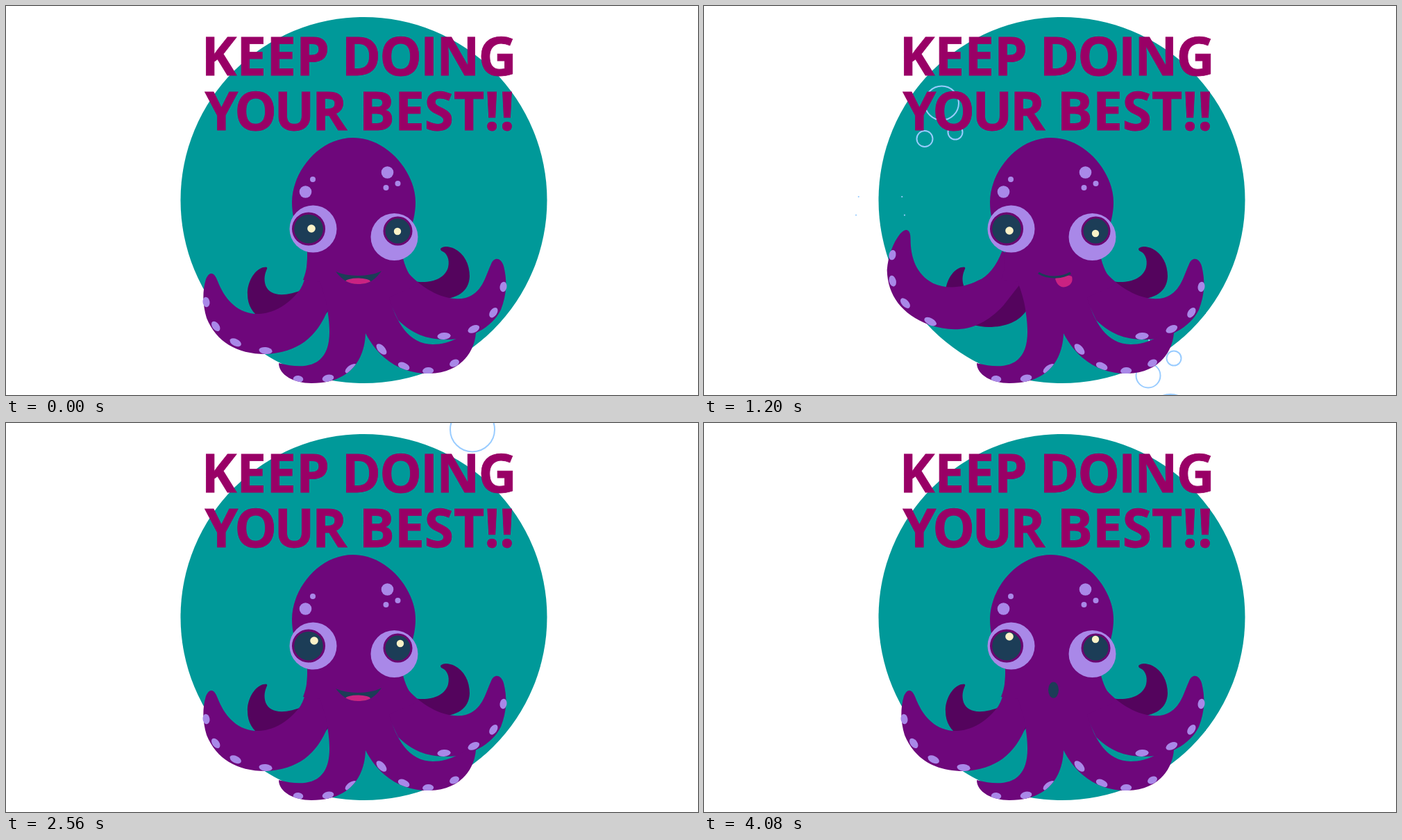
An HTML page that plays this animation: 997 by 561 pixels, repeating every 4.4 s.

```html
<!DOCTYPE html>
<html lang="en">
<head>
<meta charset="utf-8">
<title>Keep doing your best</title>
<style>
  html, body { margin: 0; width: 100%; height: 100%; overflow: hidden; background: #fff; }
  svg { display: block; width: 100%; height: 100%; }
  text { font: 700 76.5px "Open Sans", "Noto Sans", sans-serif; fill: #906; stroke: #906; stroke-width: .8; }
  .skin { fill: #6e077b; }
  .rim { fill: #6a0470; }
  .shade { fill: #54045d; }
  .lilac { fill: #a988e8; }
  .ink { fill: #1c3d57; }
  .glint { fill: #fbf2c8; }
  .pink { fill: #ca2282; }
  .ring { fill: none; stroke: #9cf; stroke-width: 2; }
  .air { fill: #9cf; }
  .shine { fill: #fff; }
</style>
</head>
<body>
<svg viewBox="0 0 997 561">
  <defs>
    <path id="body" d="M500 190C550 190 590 240 590 283C590 318 572 340 572 364C577 383 583 392 595 402
      L552 420C562 455 580 488 615 488C640 488 662 475 677 459C680 492 660 529 610 530C570 531 537 509 518 472
      C517 505 500 544 440 544C415 544 393 532 393 515C435 526 466 518 466 470C466 455 464 445 463 437
      C461 424 457 411 452 398L428 395C434 380 434 370 434 355C430 335 412 320 412 283C412 240 450 190 500 190Z"/>
    <path id="grin" d="M475 383C492 391 525 391 541 382C530 398 520 401 507 401C492 401 484 394 475 383Z"/>
    <clipPath id="inBody"><use href="#body"/></clipPath>
    <clipPath id="inGrin"><use href="#grin"/></clipPath>
    <g id="bigBubble">
      <circle class="air" r="48"/>
      <path class="shine" d="M-15 -38L-5 -41L-8 -34L-17 -32ZM-3 -41C15 -42 32 -33 38 -17C28 -30 14 -36 -5 -35Z"/>
    </g>
  </defs>

  <circle cx="515.5" cy="280" r="264" fill="#099"/>

  <g id="leftRings">
    <circle class="ring" cx="342.5" r="24.5"/>
    <circle class="ring" cx="318" cy="51.5" r="11.5"/>
    <circle class="ring" cx="362" cy="42" r="10.5"/>
  </g>
  <g id="rightRings">
    <circle class="ring" cx="640" r="17.5"/>
    <circle class="ring" cx="677" cy="-25" r="10.5"/>
    <circle class="ring" cx="650" cy="-52.5" r="9"/>
    <circle class="ring" cx="672" cy="59" r="32"/>
  </g>

  <text x="281.5" y="100">KEEP</text>
  <text x="483.5" y="100" letter-spacing="-2">DOING</text>
  <text x="286.5" y="179" letter-spacing="-3.5">YOUR</text>
  <text x="508.5" y="179">BEST!!</text>

  <path class="shade" d="M376 379C373 386 371 393 374 403C380 418 400 421 430 408L455 398L466 437
    C455 455 435 463 410 463C380 462 348 448 348 416C347 400 357 381 370 377C375 376 377 376 376 379Z"/>
  <path class="shade" d="M626 350C630 345 640 347 646 350C660 357 668 372 668 390C667 412 650 423 622 423
    L580 405L583 396C608 402 632 395 637 377C640 364 634 356 629 354C627 353 626 352 626 350Z"/>

  <g id="leftArm">
    <path class="skin" d="M434 365C434 388 428 407 417 417C398 438 376 445 358 444C330 441 314 420 305 397
      C300 383 293 382 288 394C283 410 283 430 289 450C303 484 332 502 374 502C420 500 448 478 464 437L476 398L470 368Z"/>
  </g>
  <path id="rightArm" class="skin" d="M575 380C600 410 635 427 662 421C686 414 690 392 699 372C703 362 713 362 717 375
    C722 395 722 415 713 438C700 465 665 482 634 481C605 481 585 472 565 453L540 400Z"/>
  <use href="#body" class="skin"/>
  <g id="legs" clip-path="url(#inBody)"></g>
  <g id="rightDots"></g>

  <g class="lilac">
    <circle cx="549.5" cy="240" r="8.8"/>
    <circle cx="564.5" cy="256" r="4"/>
    <circle cx="547.5" cy="262" r="4"/>
    <circle cx="431.5" cy="268" r="8.8"/>
    <circle cx="442" cy="250" r="4"/>
    <circle cx="442.5" cy="321.5" r="34"/>
    <circle cx="559.5" cy="333" r="34"/>
  </g>
  <circle class="rim" cx="436" cy="321.5" r="24"/>
  <circle class="ink" cx="436" cy="321.5" r="20.8"/>
  <circle class="rim" cx="564.5" cy="324.5" r="21"/>
  <circle class="ink" cx="564.5" cy="324.5" r="18"/>
  <g id="gaze" class="glint">
    <circle cx="440" cy="321" r="5.8"/>
    <circle cx="564" cy="325" r="5.2"/>
  </g>

  <g id="smile">
    <use href="#grin" class="ink"/>
    <ellipse class="pink" cx="507" cy="397.5" rx="18" ry="5" clip-path="url(#inGrin)"/>
  </g>
  <g id="cheeky">
    <path class="pink" d="M506 393C508 402 514 407 521 405C529 403 532 397 530 390C522 387 512 389 506 393Z"/>
    <path d="M482 385C495 393 514 393 528 385" fill="none" stroke="#1c3d57" stroke-width="3.2"/>
  </g>
  <ellipse id="gasp" class="ink" cx="503.5" cy="385" rx="7.5" ry="11.5"/>

  <use id="leftBubble" href="#bigBubble"/>
  <use id="midBubble" href="#bigBubble"/>
  <g id="rightBubble">
    <circle class="air" r="37.7"/>
    <path class="shine" d="M0 -25L4 -32C9 -33 13 -32 17 -30L14 -23C9 -25 5 -26 0 -25ZM19 -28C23 -25 26 -21 27 -16L18 -21Z"/>
  </g>
  <g id="splash" class="air"></g>
</svg>

<script>
const LOOP = 4400, TICK = 80;
const $ = id => document.getElementById(id);

const set = (el, attrs) => {
  for (const name in attrs) el.setAttribute(name, attrs[name]);
  return el;
};
const add = (parent, tag, attrs) =>
  parent.appendChild(set(document.createElementNS("http://www.w3.org/2000/svg", tag), attrs));
const mix = (a, b, u) => a + (b - a) * u;
const ramp = (k, from, to) => Math.min(1, Math.max(0, (k - from) / (to - from)));
// Rises over a..b, holds, falls over c..d
const pulse = (k, a, b, c, d) => ramp(k, a, b) - ramp(k, c, d);
const within = (k, from, to) => k >= from && k < to;

// Suckers sit along a quadratic curve, turned along it and growing toward the body
function placeSuckers(dots, [x0, y0, x1, y1, x2, y2]) {
  dots.forEach((dot, i) => {
    const t = i / (dots.length - 1);
    const ax = mix(x0, x1, t), ay = mix(y0, y1, t);
    const bx = mix(x1, x2, t), by = mix(y1, y2, t);
    const tilt = Math.atan2(by - ay, bx - ax) * 180 / Math.PI;
    set(dot, { rx: mix(7.3, 9.6, t), transform: `translate(${mix(ax, bx, t)} ${mix(ay, by, t)}) rotate(${tilt})` });
  });
}
function addSuckers(parent, count, curve) {
  const dots = Array.from({ length: count }, () => add(parent, "ellipse", { class: "lilac", ry: 5 }));
  placeSuckers(dots, curve);
  return dots;
}

const rightRest = [716.5, 405, 706, 471, 631, 476];
const rightUp = [712, 330, 729, 446, 642, 456];
addSuckers($("leftArm"), 4, [288.5, 427, 298, 488, 374, 497]);
addSuckers($("legs"), 3, [421, 538, 469, 543, 497, 523]);
addSuckers($("legs"), 4, [646, 515, 587, 545, 541, 495]);
const rightDots = addSuckers($("rightDots"), 4, rightRest);

const armShape = $("rightArm").getAttribute("d");
const bendArm = u => armShape.replace(/(\d+) (\d+)/g, (_, x, y) =>
  `${x} ${y - u * (10 + 16 * ((x - 650) / 75) ** 2)}`);

for (const side of [-1, 1])
  for (const angle of [-0.52, 0.24])
    add($("splash"), "circle", { cx: side * 36 * Math.cos(angle), cy: 36 * Math.sin(angle) });

const show = (id, on) => set($(id), { visibility: on ? "visible" : "hidden" });
const move = (id, x, y) => set($(id), { transform: `translate(${x} ${y})` });

function pop(k, at, x, y) {
  if (!within(k, at, at + 2)) return;
  const fresh = k === at;
  show("splash", true);
  set($("splash"), { transform: `translate(${x} ${y}) scale(${fresh ? 1.28 : 1})` });
  for (const drop of $("splash").children) set(drop, { r: fresh ? 2.5 : 1.1 });
}

function draw(k) {
  move("leftRings", 0, 594.5 - 30.3 * (k % 35));
  show("leftRings", k < 46);
  move("rightRings", 0, 533 - 34.27 * (k - 15));

  move("leftBubble", 257, 469 - 35 * (k - 8));
  show("leftBubble", k < 14);
  move("rightBubble", 732, 347 - 35 * (k - 26));
  show("rightBubble", within(k, 16, 28));
  move("midBubble", 452.3, 405 - 41.25 * (k - 40));
  show("midBubble", within(k, 35, 51));

  show("splash", false);
  pop(k, 14, 254, 293);
  pop(k, 28, 732, 305);

  set($("leftArm"), { transform: `rotate(${21 * pulse(k, 8, 14, 15, 20)} 463 347)` });
  const lift = pulse(k, 21, 26, 28, 31);
  set($("rightArm"), { d: bendArm(lift) });
  placeSuckers(rightDots, rightRest.map((v, i) => mix(v, rightUp[i], lift)));

  // Left, right, then down and up after the middle bubble
  move("gaze",
    8 * pulse(k, 15, 26, 30, 34) - 15 * pulse(k, 1, 6, 10, 15),
    3 * pulse(k, 3, 8, 16, 20) - 7 * pulse(k, 20, 27, 32, 34) + 5 * pulse(k, 35, 38, 40, 44) - 13 * ramp(k, 40, 48));

  const cheeky = within(k, 5, 30), gasp = k >= 37;
  show("cheeky", cheeky);
  show("gasp", gasp);
  show("smile", !cheeky && !gasp);
}

function frame() {
  draw(Math.floor(performance.now() % LOOP / TICK));
  requestAnimationFrame(frame);
}
frame();
</script>
</body>
</html>
```
